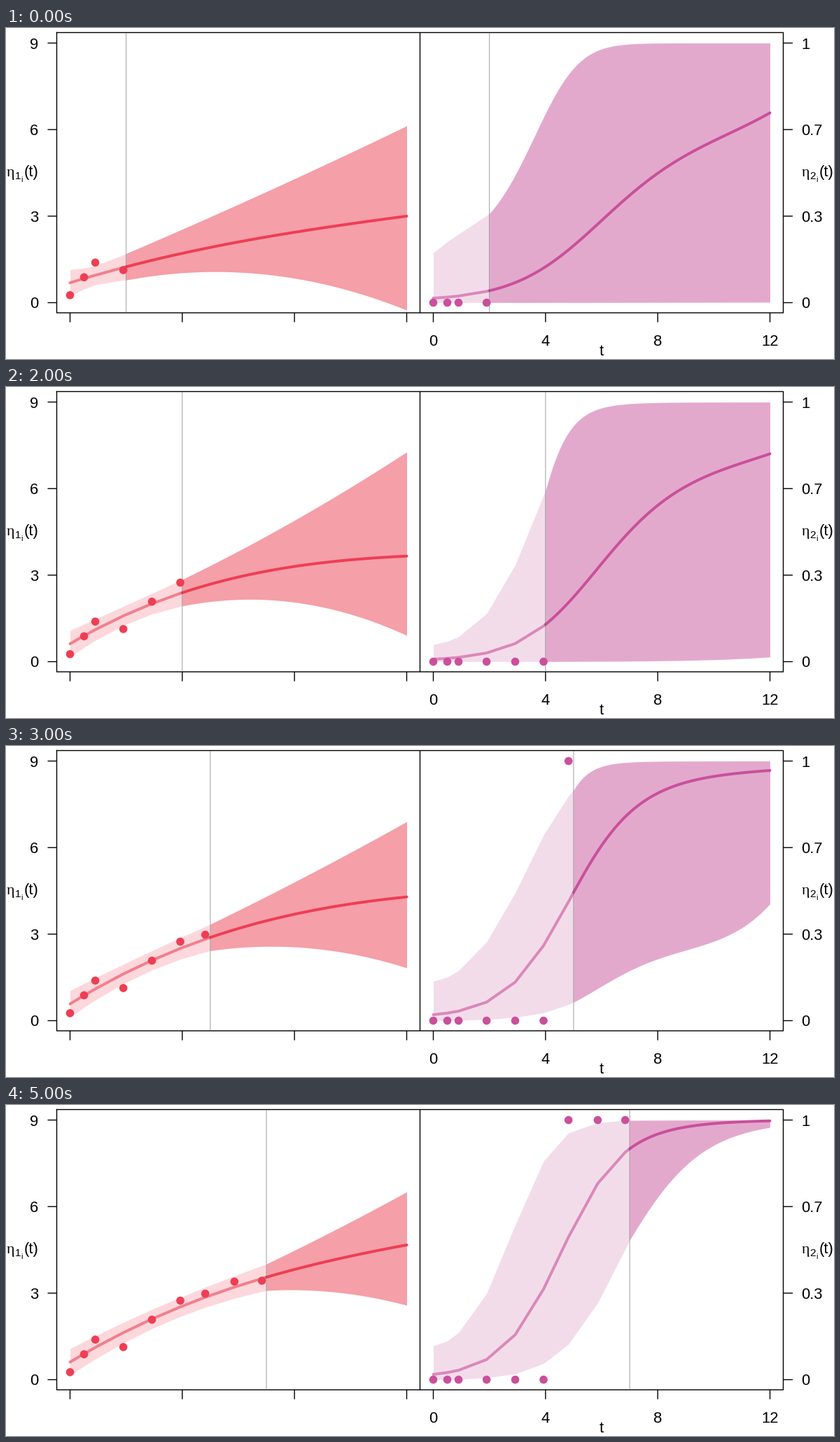
Write a matplotlib script that moves like this. It is 1183x473 px and loops after 6000 ms.

```python
import numpy as np
import matplotlib.pyplot as plt
from matplotlib.animation import FuncAnimation

W, H, DPI = 1183, 473, 64
END = 12                        # last time on the t axis
UNIT = 481 / END                # pixels per unit of t
TOP, BASE = 21.5, 392.5         # y pixels of the axis maximum and of zero
FIRST_LANDMARK, SCENES = 2, 6

VISITS = np.array([0, 0.5, 0.9, 1.9, 2.92, 3.93, 4.82, 5.86, 6.84])
MARKER = np.array([0.26, 0.88, 1.39, 1.13, 2.08, 2.74, 2.98, 3.4, 3.43])
EVENT = (VISITS > 4).astype(float)

plt.rcParams["font.family"] = "Liberation Sans"


def pt(px):
    return px * 72 / DPI


def poly(keys, start, stop):
    """Polynomial through values equally spaced from start to stop."""
    return np.poly1d(np.polyfit(np.linspace(start, stop, len(keys)), keys, len(keys) - 1))


def ramp(start, end, span, power):
    return lambda t: start + (end - start) * (t / span) ** power


def logistic(z):
    return 1 / (1 + np.exp(-z))


def growth(landmark, mean, upper, lower):
    """Continuous marker: mean at t = 0, 4, 8, 12; bounds halfway and at the end."""
    centre = poly(mean, 0, END)

    def bound(sign, keys):
        def past(t):
            return centre(t) + sign * (0.33 + 0.13 * (2 * t / landmark - 1) ** 2)
        return past, poly([past(landmark), *keys], landmark, END)

    return centre, bound(1, upper), bound(-1, lower)


def risk(landmark, mean, start, power, upper, lower):
    """Event probability on the logit scale.

    mean: every 3 units of t; upper: every 2 units from the landmark;
    lower: equally spaced from the landmark to the end.
    """
    high = ramp(start, upper[0], landmark, power), poly(upper, landmark, landmark + 4)
    low = ramp(-8, lower[0], landmark, 0.75), poly(lower, landmark, END)
    return poly(mean, 0, END), high, low


class Panel:
    def __init__(self, left, maximum, link, model, scenes, seen, colors):
        self.left, self.link, self.seen = left, link, seen
        self.scale = (BASE - TOP) / maximum
        self.scenes = [model(FIRST_LANDMARK + i, *s) for i, s in enumerate(scenes)]
        self.line, self.faded, self.band, self.pale = colors

    def x(self, t):
        return self.left + UNIT * t

    def y(self, value):
        return BASE - self.scale * value

    def curve(self, f, t):
        return self.x(t), self.y(self.link(f(t)))


red = Panel(91.5, 9, lambda v: v, growth, [
    ([0.69, 1.71, 2.44, 3.00], (3.85, 6.13), (0.98, -0.26)),
    ([0.63, 2.09, 2.92, 3.35], (4.32, 6.60), (1.49, 0.23)),
    ([0.62, 2.39, 3.30, 3.66], (4.90, 7.27), (2.06, 0.91)),
    ([0.58, 2.53, 3.69, 4.29], (5.06, 6.90), (2.52, 1.83)),
    ([0.57, 2.57, 3.82, 4.62], (5.29, 6.94), (2.92, 2.07)),
    ([0.61, 2.55, 3.82, 4.67], (5.22, 6.51), (3.03, 2.58)),
], MARKER, ("#ee3e54", "#f27f8d", "#f59fa8", "#fcd8dc"))

pink = Panel(610.5, 1, logistic, risk, [
    ([-4.03, -2.43, -0.77, 0.27, 1.00], -1.44, 0.8, (-0.65, 0.99, 3.75), (-8, -6.3)),
    ([-4.20, -2.34, -0.51, 0.60, 1.33], -2.09, 0.8, (-0.04, 2.56, 5.1), (-8, -4.65)),
    ([-4.66, -2.53, -0.50, 0.73, 1.39], -2.65, 1.4, (0.66, 3.75, 6.1), (-7.5, -4)),
    ([-3.75, -1.68, 0.73, 2.41, 3.28], -1.72, 1.5, (2.07, 5.4, 8), (-2.57, -1.33, -0.88, -0.2)),
    ([-3.88, -1.49, 1.24, 3.17, 4.40], -2.02, 1.45, (4, 6.8, 9), (-0.94, 0.48, 1.41, 2.41)),
    ([-3.88, -1.49, 1.25, 3.59, 5.73], -1.9, 1.5, (6.6, 8, 9.5), (0.15, 1.89, 3.53)),
], EVENT, ("#c9509b", "#da88ba", "#e3a9cd", "#f3dcea"))

fig = plt.figure(figsize=(W / DPI, H / DPI), dpi=DPI, facecolor="white")
ax = fig.add_axes([0, 0, 1, 1])
ax.set(xlim=(0, W), ylim=(H, 0))
ax.axis("off")
live = []


def stroke(x, y, color="black", px=1.4, cap="butt", **kw):
    return ax.plot(x, y, color=color, lw=pt(px), solid_capstyle=cap,
                   solid_joinstyle="round", snap=False, **kw)[0]


def label(x, y, text, size=22, ha="left", **kw):
    ax.text(x, y, text, fontsize=pt(size), ha=ha, va="baseline", **kw)


def eta_label(x, index):
    label(x, 212, "η", family="Liberation Serif")
    label(x + 12, 216.5, index, 15.4)
    label(x + 20.3, 219.5, "i", 11)
    label(x + 24.6, 212, "(t)")


def draw_axes():
    stroke([72.5, 1110.5, 1110.5, 72.5, 72.5], [6.5, 6.5, 407, 407, 6.5],
           cap="projecting")
    stroke([591.5, 591.5], [6.5, 407])
    for k, chance in enumerate(["0", "0.3", "0.7", "1"]):
        y = red.y(3 * k)
        stroke([59.5, 72.5], [y, y])
        stroke([1110.5, 1124], [y, y])
        label(46, y + 8, str(3 * k), ha="right")
        label(1136.5, y + 8, chance)
        for panel in (red, pink):
            stroke([panel.x(4 * k)] * 2, [407, 420.5])
        label(pink.x(4 * k), 454.5, str(4 * k), ha="center")
    label(851, 467.5, "t", ha="center")
    eta_label(0.8, "1")
    eta_label(1136.6, "2")


def draw_panel(panel, i):
    landmark = FIRST_LANDMARK + i
    visits = VISITS[:i + 4]
    past = np.append(visits, landmark)
    future = np.linspace(landmark, END, 120)
    mean, upper, lower = panel.scenes[i]

    for part, (t, color) in enumerate([(past, panel.pale), (future, panel.band)]):
        x, high = panel.curve(upper[part], t)
        _, low = panel.curve(lower[part], t)
        live.append(ax.fill_between(x, high, low, color=color, lw=0))

    live.append(stroke(*panel.curve(mean, past), panel.faded, 4, "round", zorder=3))
    live.append(stroke(*panel.curve(mean, future), panel.line, 4, "round", zorder=3))
    live.append(stroke([panel.x(landmark)] * 2, [7, 407], "#606060", 1, alpha=0.6,
                       zorder=4))
    for center in zip(panel.x(visits), panel.y(panel.seen)):
        live.append(ax.add_patch(plt.Circle(center, 5.8, color=panel.line, lw=0,
                                            zorder=5)))


def update(i):
    while live:
        live.pop().remove()
    draw_panel(red, i)
    draw_panel(pink, i)
    return list(live)


draw_axes()
anim = FuncAnimation(fig, update, frames=SCENES, interval=1000, repeat=True,
                     repeat_delay=0, init_func=lambda: update(0), blit=False)
plt.show()
```
